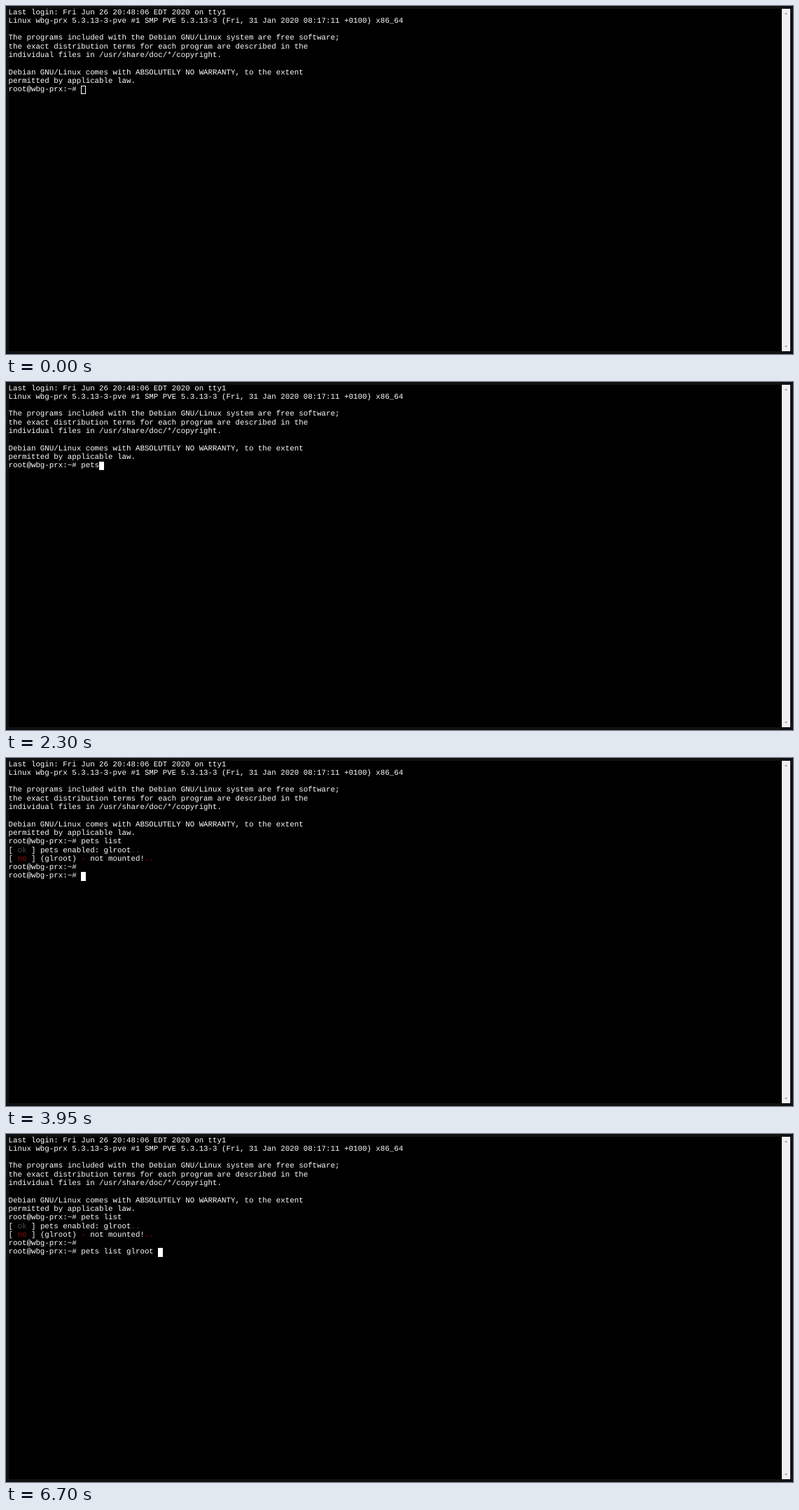
Write an HTML page that moves like this. It is 1124 by 498 pixels and loops after 8 s.

```html
<!DOCTYPE html>
<html lang="en">
<head>
<meta charset="utf-8">
<title>Terminal session</title>
<style>
  html, body { margin: 0; width: 100%; height: 100%; overflow: hidden; background: #111; }
  #screen { position: absolute; left: 3.5px; top: 3.5px; width: 1104.5px; height: 490.5px; background: #000; overflow: hidden; }
  .row {
    position: absolute; left: 0; height: 12.3px; white-space: pre; color: #fff;
    font: 10.8px/12.3px "Liberation Mono", "Courier New", monospace;
    text-rendering: geometricPrecision; font-variant-ligatures: none;
  }
  .ok { color: #4a4d45; }
  .no { color: #9c0c0c; }
  #cursor { position: absolute; width: 6.5px; height: 12.3px; box-sizing: border-box; background: #fff; }
  #cursor.hollow { background: none; border: 1px solid #fff; }
  #bar { position: absolute; left: 1108px; top: 3.5px; width: 12px; height: 490.5px; background: #f0f0f0; }
  #bar i { position: absolute; left: 3.5px; border: 2.5px solid transparent; }
  #bar .up { top: 5px; border-top: 0; border-bottom: 3px solid #a3a3a3; }
  #bar .down { bottom: 5px; border-bottom: 0; border-top: 3px solid #a3a3a3; }
</style>
</head>
<body>
<div id="screen"><div id="rows"></div><div id="cursor"></div></div>
<div id="bar"><i class="up"></i><i class="down"></i></div>
<script>
const LOOP = 8000, CHAR = 6.481, LINE = 12.3;
const PROMPT = "root@wbg-prx:~# ";
const rows = document.getElementById("rows");
const cursor = document.getElementById("cursor");

const intro = [
  "Last login: Fri Jun 26 20:48:06 EDT 2020 on tty1",
  "Linux wbg-prx 5.3.13-3-pve #1 SMP PVE 5.3.13-3 (Fri, 31 Jan 2020 08:17:11 +0100) x86_64",
  "",
  "The programs included with the Debian GNU/Linux system are free software;",
  "the exact distribution terms for each program are described in the",
  "individual files in /usr/share/doc/*/copyright.",
  "",
  "Debian GNU/Linux comes with ABSOLUTELY NO WARRANTY, to the extent",
  "permitted by applicable law."
];
const tint = (cls, text) => `<span class="${cls}">${text}</span>`;
const sent = [...intro, PROMPT + "pets list"];
const listed = [
  ...sent,
  `[ ${tint("ok", "ok")} ] pets enabled: glroot${tint("ok", "..")}`,
  `[ ${tint("no", "no")} ] (glroot) ${tint("no", "-")} not mounted!${tint("no", "..")}`
];
const again = [...listed, PROMPT];

// time, lines above, current line, hollow cursor
const steps = [
  [0, intro, PROMPT, true],
  [700, intro, PROMPT],
  [2000, intro, PROMPT + "p"],
  [2100, intro, PROMPT + "pe"],
  [2300, intro, PROMPT + "pets"],
  [2550, intro, PROMPT + "pets l"],
  [2800, intro, PROMPT + "pets list"],
  [3100, sent, ""],
  [3150, listed, PROMPT],
  [3950, again, PROMPT],
  [5800, again, PROMPT + "pe"],
  [5850, again, PROMPT + "pet"],
  [5900, again, PROMPT + "pets "],
  [6400, again, PROMPT + "pets list "],
  [6700, again, PROMPT + "pets list glroot "]
];

let shown;
function draw(time) {
  const step = steps.findLast(s => s[0] <= time);
  if (step === shown) return;
  shown = step;
  const [, above, line, hollow] = step;
  rows.innerHTML = [...above, line]
    .map((text, i) => `<div class="row" style="top:${i * LINE}px">${text}</div>`).join("");
  cursor.style.left = line.length * CHAR + "px";
  cursor.style.top = above.length * LINE + "px";
  cursor.className = hollow ? "hollow" : "";
}

const start = performance.now();
function tick() {
  draw((performance.now() - start) % LOOP);
  requestAnimationFrame(tick);
}
tick();
</script>
</body>
</html>
```
